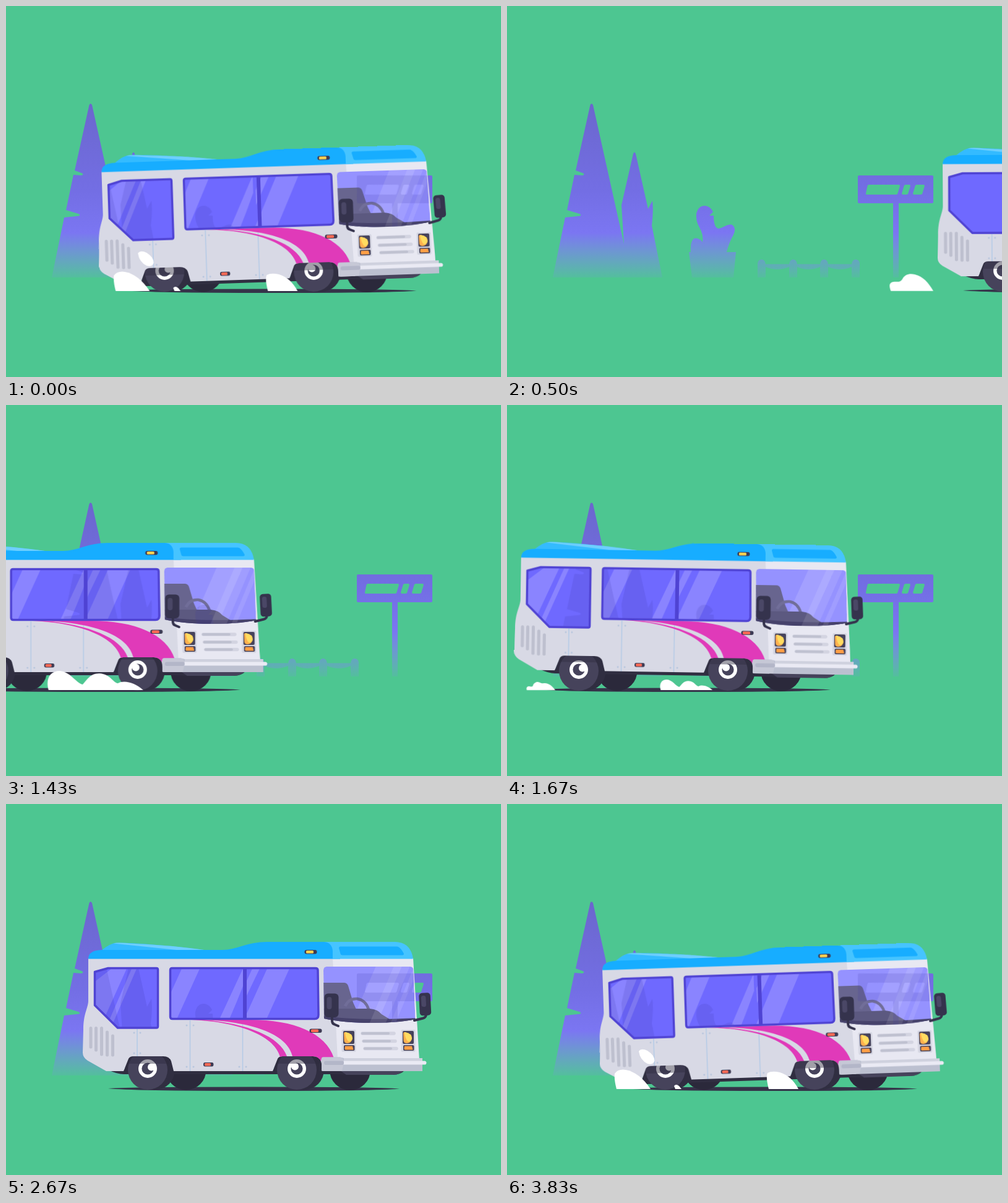
An HTML page without scripts that plays this animation: 800 px wide and 600 px high, repeating every 3.86 s.

```html
<!DOCTYPE html>
<html lang="en">
<head>
<meta charset="utf-8">
<title>Camper bus</title>
<style>
  html, body { margin: 0; width: 100%; height: 100%; overflow: hidden; background: #4dc691; }
  svg { display: block; width: 800px; height: 600px; --s: 1; }
  .inv { --s: -1; }

  /* The cycle begins with the bus off to the left, 900 ms after load. */
  .x, .y, .r, .shade, .glint, .puff { animation: 3860ms -2960ms infinite both; }
  .x { animation-name: drive; animation-timing-function: linear; }
  .y { animation-name: squat; animation-timing-function: ease-in-out; }
  .r { animation-name: tilt; animation-timing-function: ease-in-out; transform-origin: 380px 432px; }
  .shade { animation-name: shade; }
  .glint { animation-name: glint; animation-timing-function: linear; }
  .puff { animation-timing-function: ease-in-out; fill: #fff; }
  .front { animation-name: front; transform-origin: 404px 461px; }
  .rear { animation-name: rear; transform-origin: 170px 461px; }
  .kick { animation-name: kick; }
  .trail { animation-name: trail; transform-origin: 660px 461px; }

  @keyframes drive {
    0% { transform: translateX(calc(var(--s) * -743px)); }
    1.813% { transform: translateX(calc(var(--s) * -668px)); animation-timing-function: cubic-bezier(.333, .395, .667, .729); }
    13.731% { transform: translateX(calc(var(--s) * -258px)); animation-timing-function: cubic-bezier(.333, .667, .667, 1); }
    32.202%, 68.575% { transform: translateX(calc(var(--s) * 0px)); animation-timing-function: cubic-bezier(.333, 0, .667, 0); }
    75.907% { transform: translateX(calc(var(--s) * 27px)); }
    76.684% { transform: translateX(calc(var(--s) * 27px)); animation-timing-function: cubic-bezier(.333, .076, .667, .306); }
    91.451%, 100% { transform: translateX(calc(var(--s) * 737px)); }
  }
  @keyframes squat {
    0%, 66.58% { transform: translateY(calc(var(--s) * 0px)); }
    71.24% { transform: translateY(calc(var(--s) * 4px)); }
    75.91%, 76.68% { transform: translateY(calc(var(--s) * 10px)); }
    89.64%, 100% { transform: translateY(calc(var(--s) * 4px)); }
  }
  @keyframes tilt {
    0%, 13.73% { transform: rotate(calc(var(--s) * 0deg)); animation-timing-function: ease-in; }
    26.68% { transform: rotate(calc(var(--s) * 2.95deg)); animation-timing-function: ease-out; }
    28.76% { transform: rotate(calc(var(--s) * 3.3deg)); }
    38.86% { transform: rotate(calc(var(--s) * -.5deg)); }
    45.85%, 66.58% { transform: rotate(calc(var(--s) * 0deg)); }
    71.24%, 76.68% { transform: rotate(calc(var(--s) * -1.9deg)); }
    89.64%, 100% { transform: rotate(calc(var(--s) * -.3deg)); }
  }
  @keyframes shade {
    0%, 13.73% { transform: translateY(-8px); }
    26.68%, 100% { transform: none; }
  }
  @keyframes glint {
    0%, 68.58% { transform: translateX(0); }
    75.91%, 76.68% { transform: translateX(-7px); }
    89%, 100% { transform: translateX(-110px); }
  }
  @keyframes front {
    0%, 6.48% { transform: scale(0); }
    13.73% { transform: scale(1); }
    26.94%, 100% { transform: scale(0); }
  }
  @keyframes rear {
    0%, 15.54% { transform: scale(0); }
    26.68% { transform: scale(1); }
    40.16%, 100% { transform: scale(0); }
  }
  @keyframes kick {
    0%, 69.95% { transform: scale(0); }
    75.91%, 76.68% { transform: scale(1); }
    82.9%, 100% { transform: scale(0); }
  }
  @keyframes trail {
    0%, 79.27% { transform: translateX(-420px) scale(0); animation-timing-function: ease-in; }
    89.64% { transform: translateX(0) scale(1); animation-timing-function: linear; }
    94.82%, 100% { transform: translateX(30px) scale(0); }
  }
</style>
</head>
<body>
<svg viewBox="0 0 800 600">
  <defs>
    <linearGradient id="dusk" gradientUnits="userSpaceOnUse" x1="0" y1="158" x2="0" y2="440">
      <stop offset="0" stop-color="#6b67cd"/>
      <stop offset=".5" stop-color="#736ee4"/>
      <stop offset=".74" stop-color="#7b76f2"/>
      <stop offset="1" stop-color="#8781ff" stop-opacity=".1"/>
    </linearGradient>

    <g id="scene" fill-rule="evenodd">
      <path d="M134.500 160Q136.500 156 139 160L189 385L185 322L204 239Q206 234 208 239L228 328L235 315Q237 330 234 355L251 439H74L94 342L118 339.500Q121 338 117 336L97 330L109 273L122 274Q127 272 122 270L111 266Z"/>
      <path d="M294 398H297Q296 376 305 375.500Q312 376 316 382Q318 370 311 358Q305 348 306 336Q309 323 320 323Q329 324 333 333L327 339H334Q334 359 342 360C352 358 356 352 364 354Q371 359 366 370Q359 382 355 398H370L366 439H299Z"/>
      <path d="M405 439V416Q406 410 411.500 410T418 417.500H456Q457 410 462.500 410T469 417.500H506Q507 410 512.500 410T519 417.500H557Q558 410 563.500 410T570 416V439H557V422Q538 430 519 422V439H506V422Q487 430 469 422V439H456V422Q437 430 418 422V439Z"/>
      <path d="M569 274H687Q689 274 689 276V317Q689 319 687 319H633V439H624V319H569Q567 319 567 317V276Q567 274 569 274ZM585 289Q583 289 582.500 291L580 303Q579.500 305 582 305H629Q631 305 631.500 303L635 291Q635 289 633 289ZM644 289L642 290L638 303L639 305H646L648 304L652 291L651 289ZM662 289L660 290L656 303L657 305H669L671 304L675 291L674 289Z"/>
    </g>

    <path id="backGlass" d="M143.500 271.500L165 265.500H243Q245.500 265.500 245.500 268V359.500Q245.500 362 243 362H180.500L143.500 325.500Z"/>
    <path id="sideGlass" d="M268.500 265.500H500Q504 265.500 504 269L505 341Q505 347.500 499 347.500H269Q265.500 347.500 265.500 344V268.500Q265.500 265.500 268.500 265.500Z"/>
    <path id="screen" d="M518 263H653Q658 263 658.500 268L661.500 348Q640 353.500 590 354Q545 354 514 347L513 269Q513 263 518 263Z"/>
    <clipPath id="back"><use href="#backGlass"/></clipPath>
    <clipPath id="side"><use href="#sideGlass"/></clipPath>
    <clipPath id="windscreen"><use href="#screen"/></clipPath>
    <clipPath id="panes"><use href="#backGlass"/><use href="#sideGlass"/><use href="#screen"/></clipPath>

    <g id="wheel">
      <circle cx="12" cy="0" r="32" fill="#302e41"/>
      <circle r="32" fill="#46435b"/>
      <circle cy="-2" r="12.300" fill="#46435b" stroke="#fff" stroke-width="5.400"/>
    </g>
    <g id="lamp">
      <rect x="-2.500" y="-2" width="23" height="36" rx="2" fill="#d5d6e2"/>
      <rect width="18" height="21" rx="2" fill="#46435b"/>
      <path d="M1 4Q1 1.500 4 2Q15 4 15 12Q14 19 7 20Q2 20 1.500 16Z" fill="#ffb04e"/>
      <path d="M4 2Q15 4 15 12Q14 17 9 17.500Q4 13 3 2Z" fill="#ffdc60"/>
      <rect x="1" y="23" width="17.500" height="9" rx="2" fill="#46435b"/>
      <path d="M3 24.500H15L16.500 30.500H4Q2.500 30.500 2.500 28.500Z" fill="#ff9f45"/>
    </g>
    <g id="bar">
      <path d="M3 0H54" stroke="#d3d4e1"/>
      <path d="M3 0H45" stroke="#bfc1d0" stroke-width="4"/>
    </g>
    <g id="marker">
      <rect width="20" height="6.500" rx="3" fill="#3d3b54"/>
      <rect x="2.500" y="1" width="12" height="4.500" rx="1.500"/>
    </g>
  </defs>

  <rect width="800" height="600" fill="#4dc691"/>
  <use href="#scene" fill="url(#dusk)"/>

  <g class="x">
    <path d="M165 460Q200 457.500 400 457.500T636 460.500Q600 464 400 464T165 460Z" fill="#353349"/>
    <g fill="#2b293b">
      <circle cx="291" cy="430" r="32.500"/>
      <circle cx="556" cy="430" r="33"/>
    </g>

    <g class="y"><g class="r">
      <path d="M165 430H645Q638 438 625 438H560L530 437H190Q180 437 165 430Z" fill="#302e41"/>
      <path d="M540 431H643Q636 438 625 438H550Z" fill="#46435b"/>
      <path d="M190 433L198 406H267L271 433ZM431 433L439 406H508L513 433Z" fill="#302e41"/>
    </g></g>

    <g fill="#fff">
      <use href="#wheel" x="229" y="430"/><circle cx="235" cy="425.500" r="6"/>
      <use href="#wheel" x="470" y="430"/><circle cx="467" cy="424.500" r="6"/>
    </g>

    <g class="y"><g class="r">
      <path class="shade" d="M186 400H275V420H186ZM428 400H517V420H428Z" fill="#302e41" opacity=".45"/>

      <path d="M133 249V318C133 330 125 338 125 365L124 402Q124 410 132 415L162 432H190L198 412Q200 408 206 408H254Q264 408 267 416L271 432H431L439 412Q441 408 447 408H496Q506 408 509 416L513 432H537V249Z" fill="#d8d9e5"/>
      <path d="M528 249H658L668 414H536Z" fill="#e8e8f2"/>

      <!-- panel seams and vents -->
      <path d="M212 364V408M297.500 350V432M382.500 350V432" stroke="#b3cae6" stroke-width="1.500"/>
      <path d="M207 370h0M217 370h0M207 403h0M217 403h0M292 358h0M303 358h0M292 425h0M303 425h0M377 425h0M388 425h0" stroke="#b9c6dd" stroke-width="3" stroke-linecap="round"/>
      <path d="M137 362.500V393M145.500 362.500V398M154.500 362.500V405M163.500 369V406M172.500 375V406" stroke="#bec0cf" stroke-width="5" stroke-linecap="round"/>

      <!-- swoosh -->
      <g fill="#e03ab9">
        <path d="M300 349C385 353 435 378 443 409L447 408H454C443 376 390 355 320 349Z"/>
        <path d="M320 349C405 353 455 374 463 408H496Q505 408 509 416L510 411H530C517 370 465 349 395 349Z"/>
      </g>

      <!-- roof -->
      <path d="M154 237Q170 224 180 224.500Q235 225 328 237Z" fill="#34bbff"/>
      <path d="M174 225.500Q180 223.500 200 225.500Q265 228 328 237H285Z" fill="#6ecfff"/>
      <path d="M133 250.500Q133 236 156 236H350C372 236 390 223 422 223H540V250.500Z" fill="#17adff"/>
      <path d="M514 223H628Q654 223 658 250.500H528V238Q527 224 514 223Z" fill="#46c4ff"/>
      <path d="M540 230.500H632Q637 231 643 242Q643 244.500 641 244.500H544Q541 244.500 540.500 242L538 233Q538 230.500 540 230.500Z" fill="#17adff"/>
      <use href="#marker" x="482.500" y="236" fill="#ffd452"/>
      <use href="#marker" x="490.500" y="363.500" fill="#ff6a55"/>
      <use href="#marker" transform="translate(319 418) scale(.82 1)" fill="#ff6a55"/>

      <!-- windows -->
      <g fill="#6f69ff"><use href="#backGlass"/><use href="#sideGlass"/></g>
      <g fill="#8a84ff">
        <g clip-path="url(#back)">
          <path class="glint" d="M176 262H197L160 344L140 328V290ZM205 262H213L173 354L168 347Z"/>
        </g>
        <g clip-path="url(#side)">
          <path class="glint" d="M286 262H315L275 350H246ZM344 350L384 264V292L372 322L360 350ZM388 288L400 262H412L388 312ZM424 262H460L420 350H384Z"/>
        </g>
      </g>
      <g clip-path="url(#windscreen)">
        <use href="#screen" fill="#9592ff"/>
        <path d="M598 262H640L598 358H556Z" fill="#a3a0ff"/>
        <path d="M510 289H546Q551 289 553 294L561 321L566 332H510Z" fill="#68658f"/>
        <path d="M548 327Q554 314 568 315Q581 317 586 332" fill="none" stroke="#716e99" stroke-width="4.500"/>
        <path d="M510 331H588Q601 332 607 340L620 348H665V360H510Z" fill="#5c5980"/>
        <path d="M510 342Q560 351 665 346V360H510Z" fill="#46426b"/>
        <path d="M627 262H653L612 358H586ZM660 262H668L628 358H620Z" fill="#fff" opacity=".1"/>
      </g>
      <g clip-path="url(#panes)">
        <g class="r inv"><g class="y inv"><g class="x inv">
          <use href="#scene" fill="#37329f" opacity=".15"/>
        </g></g></g>
      </g>
      <g fill="none" stroke="#4f43d3" stroke-width="3.500" stroke-linejoin="round">
        <use href="#backGlass"/><use href="#sideGlass"/>
        <path d="M386 265V348" stroke-width="6"/>
      </g>

      <!-- nose -->
      <use href="#lamp" x="545" y="367"/>
      <use href="#lamp" x="641" y="367"/>
      <g fill="none" stroke-width="5.500" stroke-linecap="round">
        <use href="#bar" x="573" y="371"/><use href="#bar" x="575" y="383.500"/><use href="#bar" x="577" y="395.500"/>
      </g>
      <path d="M512 409.500H540L546 411H673V432H512Q510 432 510 430V412Q510 409.500 512 409.500Z" fill="#bcc0d0"/>
      <path d="M546 411H673V416H546Z" fill="#cfd1de"/>
      <path d="M543 415.500H677Q679.500 416 679.500 418.500T677 421.500H543Z" fill="#eaeaf4"/>
      <path d="M512 409.500H540Q546 411 546 418L543 432H512Q510 432 510 430V412Q510 409.500 512 409.500Z" fill="#c6c8d6"/>
      <rect x="514" y="415.500" width="32" height="6.500" rx="3" fill="#b3b6c8"/>

      <!-- mirrors -->
      <g fill="none" stroke="#35334d" stroke-width="4" stroke-linecap="round">
        <path d="M527 344V351Q527 355 531 356.500L537 359"/>
        <path d="M679 340Q679 345 674 346.500L660 350"/>
      </g>
      <rect x="514.500" y="306.500" width="23" height="38.500" rx="6" fill="#35334d"/>
      <rect x="518.500" y="312" width="8" height="20" rx="4" fill="#4a4766"/>
      <g transform="rotate(-3 677 324)">
        <rect x="668" y="305.500" width="18.500" height="36.500" rx="5" fill="#35334d"/>
        <rect x="671.500" y="310" width="7.500" height="18" rx="3.500" fill="#4a4766"/>
      </g>
    </g></g>

    <!-- dust -->
    <path class="puff front" d="M326 461C321 443 328 430 344 430C361 431 370 449 381 452C388 445 393 434 408 434C426 435 430 449 438 450C448 444 466 449 479 461Z"/>
    <path class="puff rear" d="M94 461C90 449 95 442 105 442C115 443 119 447 124 440C127 428 137 421 147 421C159 422 163 429 173 428C198 422 218 440 234 461Z"/>
    <g transform="translate(-27)">
      <path class="puff kick" style="transform-origin:210px 461px" d="M177 461Q173 446 174 436Q180 428 192 430Q214 434 232 461Z"/>
      <path class="puff kick" style="transform-origin:230px 420px" d="M213 400Q217 394 227 399Q238 406 238.500 415Q236 423 227 420Q215 414 213 400Z"/>
      <path class="puff kick" style="transform-origin:276px 461px" d="M270 456Q273 452 278 456L282 461H272Z"/>
      <path class="puff kick" style="transform-origin:450px 461px" d="M423 461Q418 442 421 435Q428 431 441 434Q460 440 471 461Z"/>
    </g>
  </g>

  <path class="puff trail" d="M620 461C617 453 617 447 624 446C630 445 635 448 639 441C643 434 650 432 659 434C672 437 681 447 689 461Z"/>
</svg>
</body>
</html>
```
